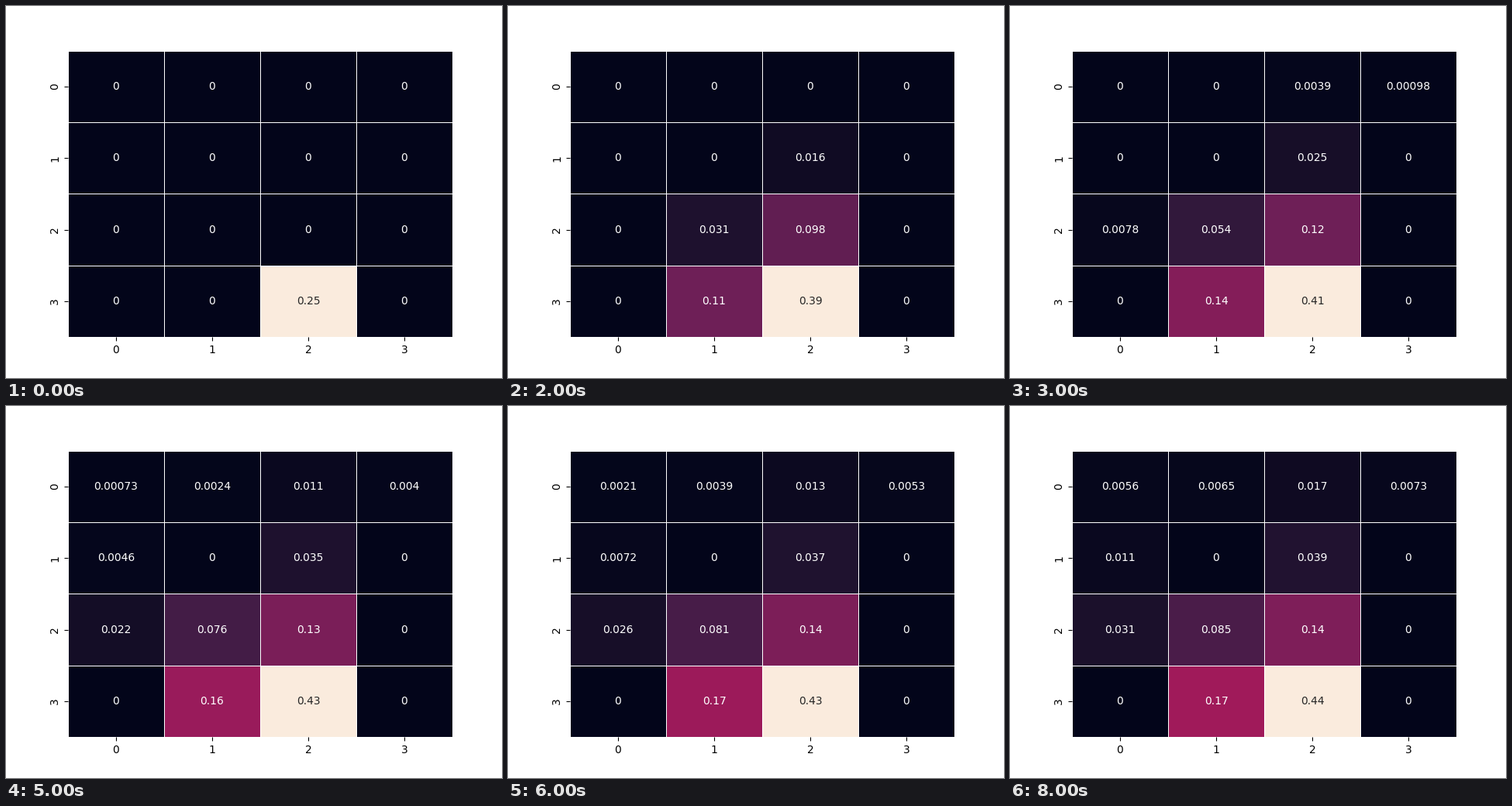
A matplotlib script that plays this animation: 640 by 480 pixels, repeating every 9 s.

```python
import numpy as np
import matplotlib.pyplot as plt
from matplotlib.animation import FuncAnimation
from matplotlib.colors import LinearSegmentedColormap

N = 4
HOLES = {(1, 1), (1, 3), (2, 3), (3, 0)}
GOAL = (3, 3)
MOVES = [(0, -1), (1, 0), (0, 1), (-1, 0)]
SWEEPS = 9

STOPS = [
    (0, "#03051a"), (4, "#07071d"), (10, "#100b23"), (16, "#180f29"),
    (23, "#221331"), (36, "#35193e"), (46, "#451c47"), (69, "#691f55"),
    (73, "#701f57"), (93, "#921c5b"), (109, "#ad1759"), (116, "#b91657"),
    (146, "#e13342"), (182, "#f37651"), (219, "#f6b48f"), (255, "#faebdd"),
]
CMAP = LinearSegmentedColormap.from_list(
    "heat", [(i / 255, c) for i, c in STOPS], N=256)


def sweep(values):
    """One in-place policy evaluation sweep of a uniform random walk."""
    v = values.copy()
    for r, c in np.ndindex(N, N):
        if (r, c) in HOLES or (r, c) == GOAL:
            continue
        total = 0.0
        for dr, dc in MOVES:
            nxt = (min(max(r + dr, 0), N - 1), min(max(c + dc, 0), N - 1))
            total += (nxt == GOAL) + v[nxt]
        v[r, c] = total / len(MOVES)
    return v


history = [sweep(np.zeros((N, N)))]
while len(history) < SWEEPS:
    history.append(sweep(history[-1]))


def luminance(rgba):
    rgb = np.asarray(rgba[:3])
    lin = np.where(rgb <= 0.03928, rgb / 12.92, ((rgb + 0.055) / 1.055) ** 2.4)
    return lin @ [0.2126, 0.7152, 0.0722]


plt.rcParams["font.family"] = "DejaVu Sans"
fig, ax = plt.subplots(figsize=(6.4, 4.8), dpi=100)
mesh = ax.pcolormesh(history[0], cmap=CMAP, linewidths=0.5, edgecolor="white")
ax.set(xlim=(0, N), ylim=(N, 0))
ax.spines[:].set_visible(False)
ticks = np.arange(N) + 0.5
ax.set_xticks(ticks, range(N))
ax.set_yticks(ticks, range(N), rotation="vertical", va="center")
labels = {
    (r, c): ax.text(c + 0.5, r + 0.5, "", ha="center", va="center")
    for r, c in np.ndindex(N, N)
}


def draw(i):
    v = history[i]
    mesh.set_array(v)
    mesh.set_clim(0, v.max())
    for cell, label in labels.items():
        label.set_text(f"{v[cell]:.2g}")
        bright = luminance(CMAP(v[cell] / v.max())) > 0.408
        label.set_color("0.15" if bright else "white")
    return [mesh, *labels.values()]


anim = FuncAnimation(fig, draw, frames=SWEEPS, interval=1000,
                     repeat=True, repeat_delay=0)
plt.show()
```
